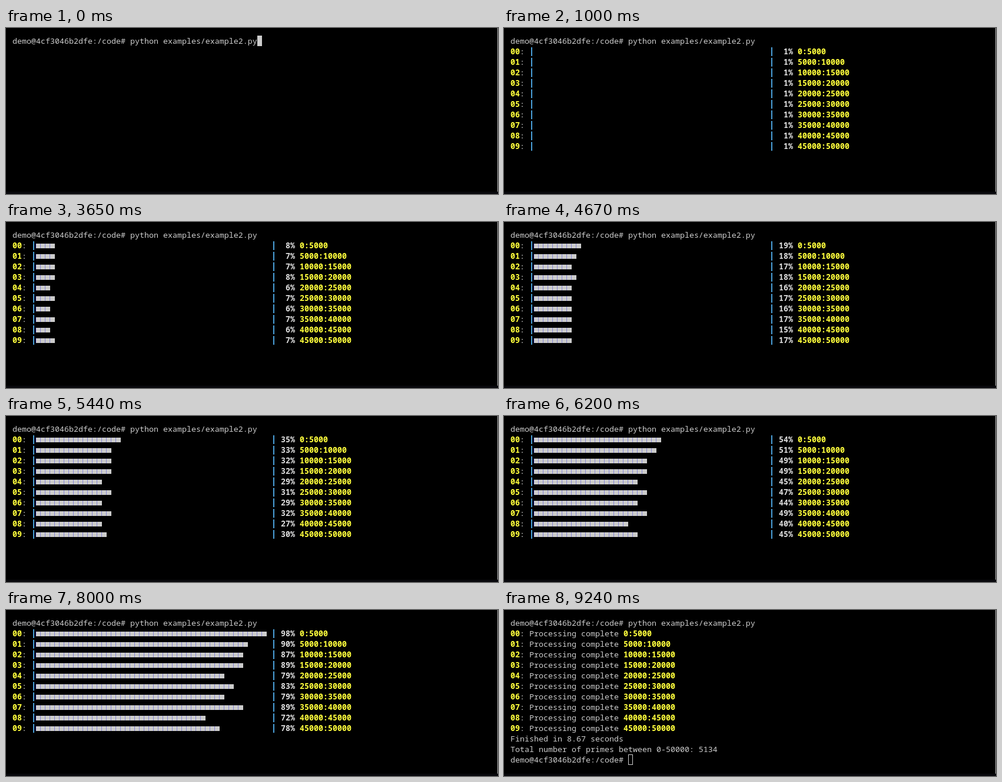
These frames come from a looping animation (836x284 px, 9.28 s). An HTML page with a canvas:

```html
<!DOCTYPE html>
<html lang="en">
<head>
<meta charset="utf-8">
<title>Parallel progress bars</title>
<style>
  html, body { margin: 0; width: 100%; height: 100%; overflow: hidden; background: #000; }
  canvas { display: block; }
</style>
</head>
<body>
<canvas id="stage" width="836" height="284"></canvas>
<script>
const ctx = document.getElementById('stage').getContext('2d');
const LOOP = 9280, START = 530, LAST_KNOT = 8000, FINISH = 8690, SUMMARY = 8790, BLUR = 9240;
const LEFT = 11, TOP = 13, CELL = 8, LINE = 18, BAR_CELLS = 50;
const GRAY = '#cccccc', WHITE = '#dcdcdc', YELLOW = '#ffff3c', BLUE = '#4a9fd8';
const PROMPT = 'demo@4cf3046b2dfe:/code# ';

// Percentages of the ten workers at moments in the run, with the easing power leading there.
const knots = [
  { at: START, values: Array(10).fill(0) },
  { at: 2090, power: 1, values: [4, 4, 3, 4, 3, 3, 3, 3, 2, 3] },
  { at: 3650, power: 1, values: [8, 7, 7, 8, 6, 7, 6, 7, 6, 7] },
  { at: 5440, power: 1.55, values: [35, 33, 32, 32, 29, 31, 29, 32, 27, 30] },
  { at: 6200, power: 1, values: [54, 51, 49, 49, 45, 47, 44, 49, 40, 45] },
  { at: LAST_KNOT, power: 1, values: [98, 90, 87, 89, 79, 83, 79, 89, 72, 78] }
];

const colX = col => LEFT + col * CELL;
const baseline = row => TOP + row * LINE + 14;

function rect(color, x, y, w, h) {
  ctx.fillStyle = color;
  ctx.fillRect(x, y, w, h);
}

function text(str, col, row, color = GRAY, bold = false) {
  ctx.font = `${bold ? 'bold ' : ''}13.3333px "Noto Sans Mono", monospace`;
  ctx.fillStyle = color;
  ctx.fillText(str, colX(col), baseline(row));
}

function cursor(col, row, hollow) {
  const x = colX(col), y = TOP + row * LINE;
  rect(GRAY, x, y, CELL, LINE);
  if (hollow) rect('#000', x + 1, y + 1, CELL - 2, LINE - 2);
}

function percentAt(worker, t) {
  if (t >= LAST_KNOT) {
    // The remaining workers speed up as the others finish.
    const u = (t - LAST_KNOT) / (FINISH - LAST_KNOT);
    return knots.at(-1).values[worker] + 12.3 * u + 15.7 * u * u;
  }
  const next = knots.findIndex(k => k.at > t);
  const a = knots[next - 1], b = knots[next];
  const u = ((t - a.at) / (b.at - a.at)) ** b.power;
  return a.values[worker] + (b.values[worker] - a.values[worker]) * u;
}

function roundHalfEven(x) {
  const low = Math.floor(x);
  return x - low === 0.5 ? low + low % 2 : Math.round(x);
}

function drawBar(row, percent) {
  const y = baseline(row);
  for (const col of [4, 5 + BAR_CELLS]) rect(BLUE, colX(col) + 3, y - 12, 2, 15);
  const blocks = roundHalfEven(percent / 2);
  for (let i = 0; i < blocks; i++) {
    const x = colX(5 + i);
    rect(GRAY, x, y - 8, CELL, 8);
    rect(i ? '#8585d4' : '#000070', x - 1, y - 8, 1, 8);
  }
  text(`${percent}%`.padStart(4), 56, row, WHITE, true);
}

function drawWorker(worker, t) {
  const row = worker + 1;
  const range = `${worker * 5000}:${row * 5000}`;
  const progress = percentAt(worker, t);
  const done = t >= FINISH || progress >= 100;
  text(String(worker).padStart(2, '0'), 0, row, YELLOW, true);
  text(':', 2, row);
  if (done) text('Processing complete', 4, row);
  else drawBar(row, Math.min(99, Math.round(progress)));
  text(range, done ? 24 : 61, row, YELLOW, true);
}

function draw(t) {
  rect('#000', 0, 0, 836, 284);
  rect('#08080c', 0, 280, 836, 4);
  rect('#b0b0b0', 835, 0, 1, 280);

  const command = PROMPT + 'python examples/example2.py';
  text(command, 0, 0);
  if (t < START) {
    cursor(command.length, 0);
    return;
  }
  for (let worker = 0; worker < 10; worker++) drawWorker(worker, t);
  if (t >= SUMMARY) {
    text('Finished in 8.67 seconds', 0, 11);
    text('Total number of primes between 0-50000: 5134', 0, 12);
    text(PROMPT, 0, 13);
    cursor(PROMPT.length, 13, t >= BLUR);
  }
}

const begin = performance.now();
function frame() {
  draw((performance.now() - begin) % LOOP);
  requestAnimationFrame(frame);
}
frame();
</script>
</body>
</html>
```
